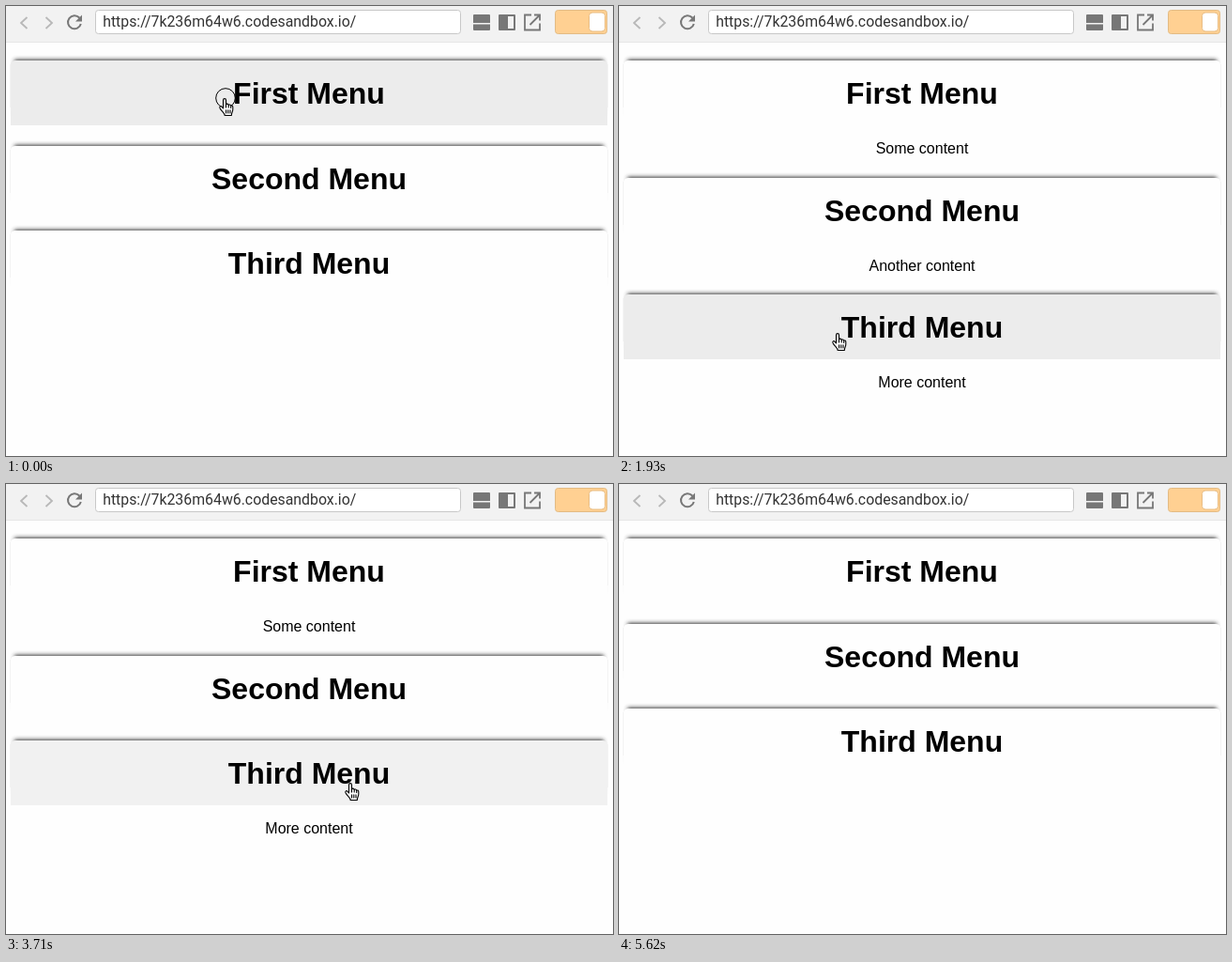
Write an HTML page that moves like this. It is 647 px wide and 479 px high and loops after 6.84 s.

```html
<!DOCTYPE html>
<html lang="en">
<head>
<meta charset="utf-8">
<title>Accordion menu</title>
<style>
  html, body { margin: 0; width: 100%; height: 100%; overflow: hidden; background: #fefefe; }
  svg { display: block; width: 647px; height: 479px; }
  .title { font: bold 32px "Liberation Sans", Arial, sans-serif; text-anchor: middle; }
  .text { font: 16px "Liberation Sans", Arial, sans-serif; text-anchor: middle; }
  .url { font: 15.85px Roboto, sans-serif; fill: #333; }
</style>
</head>
<body>
<svg viewBox="0 0 647 479" xmlns="http://www.w3.org/2000/svg">
  <defs>
    <filter id="soft" x="-5%" y="-30%" width="110%" height="160%"><feGaussianBlur stdDeviation="2"/></filter>
  </defs>
  <rect width="647" height="479" fill="#fefefe"/>

  <g id="toolbar">
    <rect width="647" height="38" fill="#f2f2f2"/>
    <rect y="38" width="647" height="1" fill="#e6e6e6"/>
    <g fill="none" stroke-width="1.8">
      <path d="M22.5 12l-6.5 6 6.500 6M42.500 12l6.500 6-6.500 6" stroke="#b8b8b8"/>
      <path d="M78.200 12.500A7 7 0 1 0 79.800 19" stroke="#777" stroke-width="2"/>
    </g>
    <path d="M81 9.500v7h-7z" fill="#777"/>
    <rect x="95.500" y="4.500" width="389" height="25" rx="3" fill="#fff" stroke="#c8c8c8"/>
    <text class="url" x="103.200" y="22">https://7k236m64w6.codesandbox.io/</text>
    <g fill="#777">
      <rect x="498" y="9" width="18" height="17" rx="1"/>
      <rect x="498" y="18" width="18" height="1.500" fill="#f2f2f2"/>
      <rect x="525" y="9" width="18" height="17" rx="1"/>
      <rect x="535" y="11" width="6" height="13" fill="#f2f2f2"/>
    </g>
    <path d="M560 9.500h-7v16h16v-7M563 9.500h6v6M569 9.500l-10.500 10.500" fill="none" stroke="#777" stroke-width="1.800"/>
    <rect x="585.500" y="4.500" width="55" height="25" rx="3" fill="#ffd092" stroke="#e3bb84"/>
    <rect x="621.500" y="7" width="17" height="20" rx="3.500" fill="#fff" stroke="#e9bd82"/>
  </g>

  <g id="menus"></g>

  <g id="popup">
    <rect x="229.500" y="134.500" width="26" height="26" rx="4" fill="#f5f5f5" stroke="#dadada"/>
    <rect x="234" y="139" width="16" height="16" fill="#4c87e6"/>
  </g>

  <g id="cursor">
    <circle id="ring" r="10.300" fill="none" stroke="#000"/>
    <g transform="translate(-7 0)" stroke="#000" stroke-width="1.100" stroke-linejoin="round" stroke-linecap="round">
      <path fill="#fff" d="M4.500 11V2.200C4.500.1 7.500.1 7.500 2.200V7C8 5.600 10.200 5.900 10.200 7.600C10.800 6.500 12.700 6.800 12.700 8.500C13.400 7.600 14.800 8 14.800 9.600V12C14.800 14.500 13.300 15.500 13.300 18.500H6.200C6.200 16 2.600 14 1 10.800C.2 9 1.900 8 3.100 9.300Z"/>
      <path fill="none" d="M7.500 7V10M10.200 7.600V10M12.700 8.500V10.400M7.600 12.800V16M9.800 12.800V16M12 12.800V16"/>
    </g>
  </g>
</svg>
<script>
const LOOP = 6840;
const HEAD = 69, CONTENT = 34;
const TOPS = [58, 149, 239];
const MENUS = [
  ["First Menu", "Some content"],
  ["Second Menu", "Another content"],
  ["Third Menu", "More content"]
];

// Each step changes only the listed parts of the state before it.
const STEPS = [
  { t: 0, at: [234, 98], click: true, hover: 0, shade: "#ececec", open: [], marked: false, popup: false },
  { t: 150, click: false, open: [0], marked: true },
  { t: 300, at: [243, 160], hover: -1, popup: true },
  { t: 450, at: [250, 202], hover: 1, shade: "#f3f3f3" },
  { t: 890, click: true, shade: "#ececec", open: [0, 1], marked: false, popup: false },
  { t: 1040, click: false },
  { t: 1190, at: [247, 245] },
  { t: 1330, at: [238, 312], hover: 2, shade: "#f3f3f3" },
  { t: 1480, at: [234, 348], shade: "#ececec" },
  { t: 1780, click: true, open: [0, 1, 2] },
  { t: 1930, click: false },
  { t: 2370, at: [232, 326] },
  { t: 2520, at: [224, 270], hover: -1 },
  { t: 2670, at: [219, 228], hover: 1, shade: "#f1f1f1" },
  { t: 2820, click: true, shade: "#ececec", open: [0, 2] },
  { t: 2970, click: false },
  { t: 3270, at: [240, 300], hover: 2, shade: "#f3f3f3" },
  { t: 3420, at: [270, 348], hover: -1 },
  { t: 3710, at: [368, 318], hover: 2, shade: "#f1f1f1" },
  { t: 3860, at: [386, 304], shade: "#ececec" },
  { t: 4160, click: true, open: [0] },
  { t: 4300, click: false },
  { t: 4450, at: [340, 190], hover: 1, shade: "#f3f3f3" },
  { t: 4590, at: [301, 110], hover: 0, shade: "#f1f1f1" },
  { t: 4890, click: true, shade: "#ececec", open: [] },
  { t: 5030, click: false },
  { t: 5330, at: [340, 118] },
  { t: 5480, at: [387, 134], hover: -1 },
  { t: 5620, at: null }
];

const states = [];
for (const step of STEPS) states.push({ ...states[states.length - 1], ...step });

const byId = id => document.getElementById(id);
const show = (node, on) => node.setAttribute("visibility", on ? "inherit" : "hidden");
const move = (node, x, y) => node.setAttribute("transform", `translate(${x} ${y})`);

function add(parent, tag, attrs, text) {
  const node = document.createElementNS("http://www.w3.org/2000/svg", tag);
  for (const name in attrs) node.setAttribute(name, attrs[name]);
  if (text) node.textContent = text;
  return parent.appendChild(node);
}

const menus = MENUS.map(([title, content]) => {
  const group = add(byId("menus"), "g", {});
  add(group, "rect", { x: 9, y: -1, width: 628, height: 58, rx: 1, fill: "#333", filter: "url(#soft)" });
  const head = add(group, "path", { d: `M5 ${HEAD}V5Q5 0 10 0H636Q641 0 641 5V${HEAD}Z` });
  for (const x of [4, 641]) add(group, "rect", { x, y: 4, width: 1, height: 46, fill: "#f3f3f3" });
  const mark = add(group, "rect", { x: 242, y: 16, width: 69, height: 37, fill: "#c2f693", visibility: "hidden" });
  add(group, "text", { class: "title", x: 323, y: 46 }, title);
  const body = add(group, "text", { class: "text", x: 323, y: 99 }, content);
  return { group, head, mark, body };
});

function draw(time) {
  const state = states.findLast(s => s.t <= time);
  let shift = 0;
  menus.forEach((menu, i) => {
    const open = state.open.includes(i);
    move(menu.group, 0, TOPS[i] + shift);
    menu.head.setAttribute("fill", state.hover === i ? state.shade : "#fefefe");
    show(menu.body, open);
    if (open) shift += CONTENT;
  });
  show(menus[0].mark, state.marked);
  show(byId("popup"), state.popup);
  show(byId("cursor"), state.at);
  show(byId("ring"), state.click);
  if (state.at) move(byId("cursor"), ...state.at);
}

const start = performance.now();
function tick() {
  draw((performance.now() - start) % LOOP);
  requestAnimationFrame(tick);
}
tick();
</script>
</body>
</html>
```
